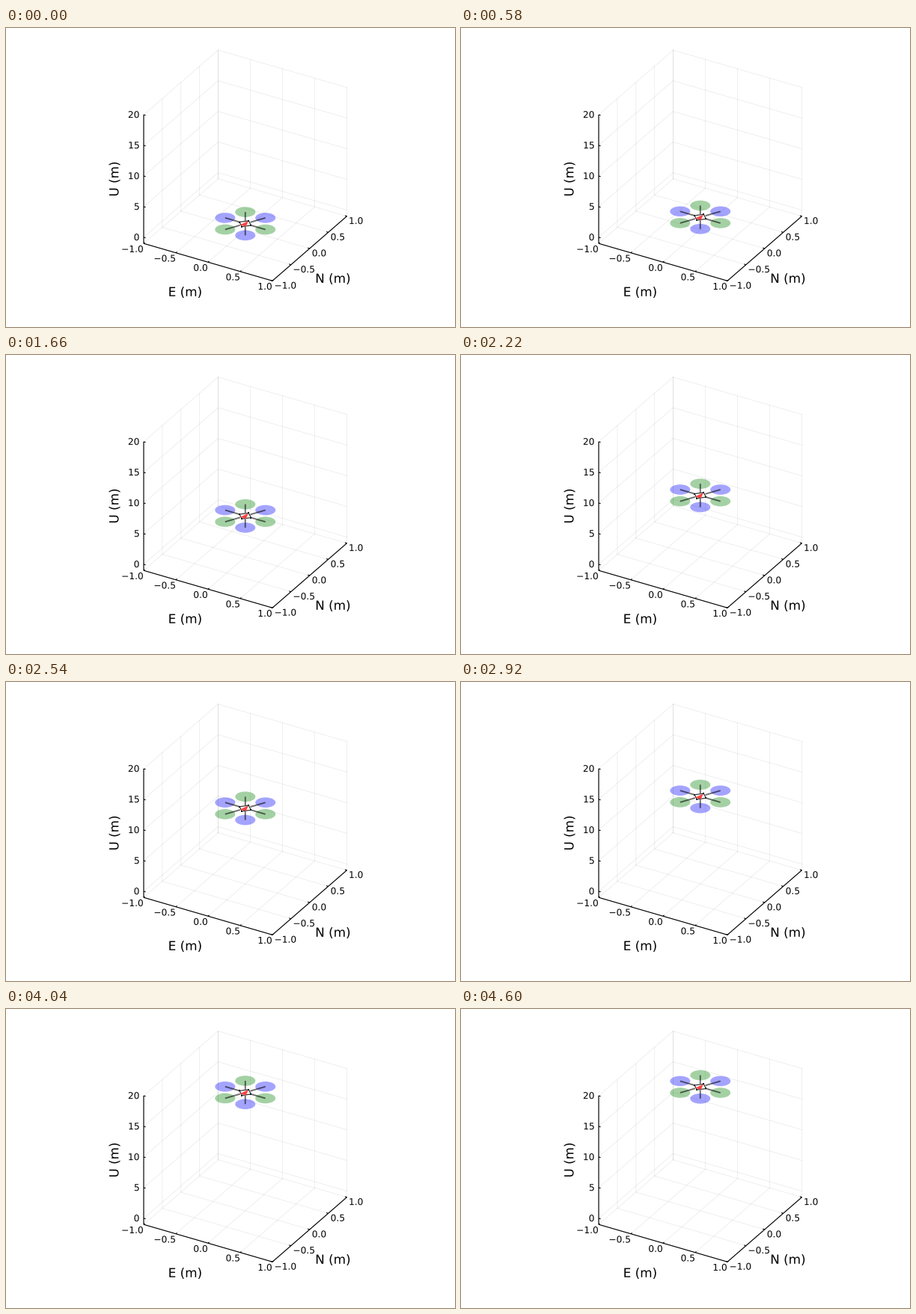
A matplotlib script that plays this animation: 600x400 px, repeating every 4700 ms.

```python
import numpy as np
import matplotlib.pyplot as plt
from matplotlib.animation import FuncAnimation
from matplotlib.patches import Ellipse, PathPatch, Polygon
from matplotlib.textpath import TextPath
from matplotlib.transforms import Affine2D

plt.rcParams["font.family"] = "DejaVu Sans"

WIDTH, HEIGHT, DPI = 600, 400, 100
TICK_MS, LOOP_MS = 20, 4700
PT = 72 / DPI  # points per pixel

E_VEC = np.array([86.0, 25.0])
N_VEC = np.array([49.75, -43.25])
U_VEC = np.array([0.0, -8.2])
FLOOR = np.array([319.75, 270.0])
Z_MIN, Z_MAX = -1, 20

fig = plt.figure(figsize=(WIDTH / DPI, HEIGHT / DPI), dpi=DPI, facecolor="white")
ax = fig.add_axes([0, 0, 1, 1])
ax.set_xlim(0, WIDTH)
ax.set_ylim(HEIGHT, 0)
ax.axis("off")


def project(e, n, u):
    return FLOOR + e * E_VEC + n * N_VEC + (u - Z_MIN) * U_VEC


def line(points, px, **style):
    xs, ys = np.array(points).T
    return ax.plot(xs, ys, lw=px * PT, snap=False, **style)[0]


def label(x, y, text, px=12.2, align=0.5, angle=0):
    """Outlined text on baseline y; align 0, 0.5, 1 is left, center, right."""
    path = TextPath((0, 0), text, size=px)
    box = path.get_extents()
    place = (Affine2D().translate(-box.x0 - align * box.width, 0)
             .scale(1, -1).rotate_deg(-angle).translate(x, y))
    ax.add_patch(PathPatch(place.transform_path(path), fc="black", lw=0, zorder=2))


def draw_grid():
    style = dict(color="black", alpha=0.07, zorder=1)
    for v in np.linspace(-1, 1, 5):
        # floor and back wall, then floor and left wall
        line([project(v, -1, Z_MIN), project(v, 1, Z_MIN)], 0.9, **style)
        line([project(v, 1, Z_MIN), project(v, 1, Z_MAX)], 0.9, **style)
        line([project(-1, v, Z_MIN), project(1, v, Z_MIN)], 0.9, **style)
        line([project(-1, v, Z_MIN), project(-1, v, Z_MAX)], 0.9, **style)
    for u in range(0, 21, 5):
        line([project(-1, -1, u), project(-1, 1, u), project(1, 1, u)], 0.9, **style)


def draw_axes():
    style = dict(color="black", zorder=2, solid_capstyle="butt")
    line([project(-1, -1, Z_MAX), project(-1, -1, Z_MIN)], 1.15, **style)
    line([project(-1, -1, Z_MIN), project(1, -1, Z_MIN), project(1, 1, Z_MIN)],
         1.15, **style)

    tick = 0.03
    for v in np.linspace(-1, 1, 5):
        text = f"{v:.1f}".replace("-", "\u2212")
        x, y = project(v, -1, Z_MIN)
        line([(x, y), project(v, -1 + tick, Z_MIN)], 1.1, **style)
        label(x - 1.1, y + 11.7, text, align=1)
        x, y = project(1, v, Z_MIN)
        line([(x, y), project(1 - tick, v, Z_MIN)], 1.1, **style)
        label(x + 3.8, y + 10.4, text, align=0)
    for u in range(0, 21, 5):
        x, y = project(-1, -1, u)
        line([(x, y), project(-1 + tick, -1, u)], 1.1, **style)
        label(x - 6.4, y + 4.1, str(u), align=1)

    label(239.5, 358.8, "E (m)", 16.8)
    label(437, 340.8, "N (m)", 16.8)
    label(150.3, 202, "U (m)", 16.8, angle=90)


def draw_drone(shift):
    moving = shift + ax.transData
    arm, rotor, body = 0.313, 0.136, 0.09

    def place(e, n):
        return project(e, n, 0)

    angles = np.radians(np.arange(0, 360, 60))
    for k, a in enumerate(angles):
        center = place(arm * np.cos(a), arm * np.sin(a))
        disc = Ellipse(center, 2 * rotor * 99.35, 2 * rotor * 49.96, lw=0,
                       fc="blue" if k % 2 else "green", alpha=0.355, zorder=3)
        disc.set_transform(moving)
        ax.add_patch(disc)
    for a in angles:
        ends = [place(r * np.cos(a), r * np.sin(a)) for r in (0.08, arm)]
        line(ends, 1.9, color="black", alpha=0.57, zorder=4, transform=moving,
             solid_capstyle="butt")

    corners = [place(body, 0), place(0, body), place(-body, 0), place(0, -body)]
    frame = Polygon(corners, fc="none", ec="#303030", lw=1.2 * PT, zorder=5)
    nose = Polygon([place(0, 0.085), place(0.045, -0.06), place(-0.045, -0.06)],
                   fc="#ff4040", lw=0, zorder=6)
    for patch in (frame, nose):
        patch.set_transform(moving)
        ax.add_patch(patch)
    line(corners, 0, color="#202020", marker="s", ms=2.3 * PT, mew=0,
         zorder=6, transform=moving)


# climb in pixels against simulation step, smoothed by a polynomial
LAST = 98
steps = np.array([0, 11, 22, 23, 34, 35, 46, 47, 58, 62, 70, 74, 82, 94, 98])
climbs = [0, 6.5, 21.1, 23, 44.4, 46.5, 71.5, 74, 99.5, 108.8, 125.5, 132.8,
          145.5, 156.1, 157.7]
climb = np.poly1d(np.polyfit(steps / LAST, climbs, 5))


def step_at(ms):
    """Steps come in threes, held for 20, 20 and 100 ms."""
    if ms < 120:
        return min(ms // 20, 1)
    group, rest = divmod(ms - 120, 140)
    return min(2 + 3 * group + min(rest // 20, 2), LAST)


shift = Affine2D()
draw_grid()
draw_axes()
draw_drone(shift)


def update(i):
    rise = climb(step_at(i * TICK_MS) / LAST)
    shift.clear().translate(0, -rise)
    return []


anim = FuncAnimation(fig, update, frames=LOOP_MS // TICK_MS, interval=TICK_MS,
                     repeat=True, repeat_delay=0, blit=False)
plt.show()
```
